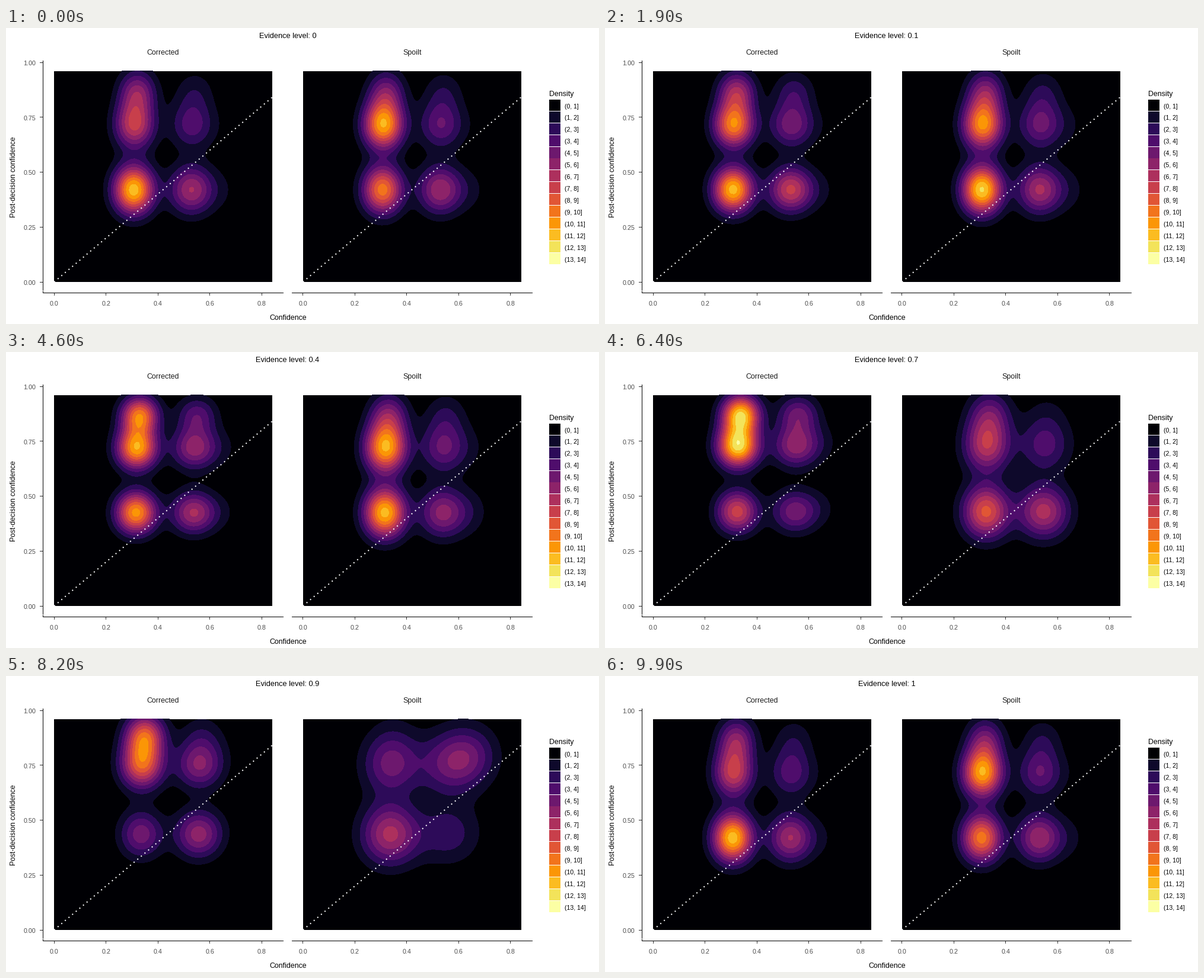
These frames come from a looping animation (1000x500 px, 10 s). A matplotlib script:

```python
import numpy as np
import matplotlib
import matplotlib.pyplot as plt
from matplotlib.animation import FuncAnimation
from matplotlib.patches import Rectangle

W, H, DPI = 1000, 500, 100
PX = 72 / DPI                      # points per pixel
plt.rcParams["font.family"] = "Liberation Sans"

# Panel geometry in stage pixels, y pointing down
LEFT, BOTTOM = 81.1, 429
UNIT_X, UNIT_Y = 437.5, 371.0      # pixels per data unit
MAX_X, MAX_Y = 0.842, 0.96
SHIFT = 419.6                      # second panel's offset

COLORS = matplotlib.colormaps["inferno"](np.linspace(0, 1, 14))
CONF = np.linspace(0, MAX_X, 120)
POST = np.linspace(0, MAX_Y, 120)
GX, GY = np.meshgrid(CONF, POST)

# Lobe heights at a few evidence levels; rows run low, middle, high
KEYS = (0, 0.25, 0.5, 0.7, 0.9)
CORRECTED = {
    "left": ((11.6, 11.4, 10.4, 7.5, 4.6),
             (7.1, 10.5, 10.7, 12.2, 8.4),
             (5.0, 6.0, 9.4, 11.4, 8.0)),
    "right": ((6.0, 7.5, 6.1, 4.6, 5.5),
              (3.5, 4.9, 5.5, 5.4, 5.0),
              (1.6, 2.7, 3.6, 4.2, 1.6)),
    "tail": ((0.8, 0.9, 0.8, 0.9, 0.2),
             (0.3, 0.5, 0.9, 1.0, 0.3)),
}
SPOILT = {
    "left": ((9.5, 12.8, 11.4, 8.3, 6.3),
             (10.8, 9.9, 10.8, 6.5, 4.2),
             (4.2, 4.8, 4.6, 3.9, 0.8)),
    "right": ((5.9, 6.2, 5.3, 6.4, 2.5),
              (3.9, 4.3, 4.0, 3.3, 3.4),
              (1.7, 1.9, 1.9, 1.0, 0.2)),
    "tail": ((1.0, 1.1, 1.3, 0.2, 0.2),
             (0.4, 0.9, 0.8, 0.2, 3.0)),
}
COLUMNS = {"left": (0.307, 1.0), "right": (0.528, 1.08), "tail": (0.645, 1.0)}


def corrected_width(e):
    return 0.053 + 0.006 * e**4, 0.076 - 0.025 * e + 0.032 * e**4


def spoilt_width(e):
    return 0.053 + 0.035 * e**4, 0.076 + 0.03 * e**4


def density(heights, width, e):
    """Sum of Gaussian lobes that drift and widen with evidence e."""
    sx, sy = width(e)
    rows = ((0.42 + 0.02 * e**2, 0, 1),
            (0.715 + 0.055 * e**4, 0.003, 1),
            (0.865 + 0.03 * e**4, 0.014, 0.92))
    total = np.zeros_like(GX)
    for column, (x0, wide) in COLUMNS.items():
        for (y, lean, narrow), keys in zip(rows, heights[column]):
            x = x0 + 0.035 * e**2 + lean
            if column == "tail":
                x, y = x0, y + 0.07 * e**4
            total += np.interp(e, KEYS, keys) * np.exp(
                -((GX - x) / (sx * wide * narrow)) ** 2 / 2
                - ((GY - y) / (sy * narrow)) ** 2 / 2)
    return total


fig = plt.figure(figsize=(W / DPI, H / DPI), dpi=DPI, facecolor="white")
ax = fig.add_axes([0, 0, 1, 1])
ax.axis("off")


def label(x, y, text, size=12.4, color="black", ha="center"):
    return ax.text(x, y, text, fontsize=size * PX, color=color, ha=ha,
                   va="baseline")


def box(x, y, w, h, color):
    ax.add_patch(Rectangle((x, y), w, h, fc=color, lw=0, antialiased=False))


def draw_panel(shift, name):
    left = LEFT + shift
    box(left, BOTTOM - MAX_Y * UNIT_Y, MAX_X * UNIT_X, MAX_Y * UNIT_Y,
        COLORS[0])
    label(265 + shift, 45, name, color="#1A1A1A")
    box(left - 19, 447, 406, 1, "black")
    for value in (0, 0.2, 0.4, 0.6, 0.8):
        x = left + value * UNIT_X
        box(int(x), 448, 1, 4, "#333333")
        label(x, 469, f"{value:.1f}", 10.8, "#4D4D4D")
    ends = np.array([-0.042, 0.884])
    ax.plot(left + ends * UNIT_X, BOTTOM - ends * UNIT_Y, color="white",
            lw=2 * PX, ls=(0, (1, 3)), dash_capstyle="butt", zorder=5)


def contours(z, shift):
    return ax.contourf(LEFT + shift + CONF * UNIT_X, BOTTOM - POST * UNIT_Y, z,
                       levels=range(1, 15), colors=COLORS[1:],
                       antialiased=False, zorder=2)


draw_panel(0, "Corrected")
draw_panel(SHIFT, "Spoilt")

box(62, 55, 1, 393, "black")
for value in (0, 0.25, 0.5, 0.75, 1):
    y = BOTTOM - value * UNIT_Y
    box(57, int(y), 5, 1, "#333333")
    label(50.5, y + 4.8, f"{value:.2f}", 10.8, "#4D4D4D", "right")

title = label(475, 17, "", 12.7)
label(475.5, 493, "Confidence")
ax.text(16, 252, "Post-decision confidence", fontsize=12.25 * PX,
        rotation=90, rotation_mode="anchor", ha="center", va="baseline")

label(916, 115, "Density", ha="left")
for i, color in enumerate(COLORS):
    y = 120.8 + 19.93 * i
    box(916, round(y), 19, 19, color)
    label(942, y + 14.7, f"({i}, {i + 1}]", 10.5, ha="left")

LEVELS = np.arange(11) / 10
layers = [(contours(density(CORRECTED, corrected_width, e), 0),
           contours(density(SPOILT, spoilt_width, e), SHIFT))
          for e in LEVELS]
ax.set_xlim(0, W)
ax.set_ylim(H, 0)

# First frame of each step; the surface switches one frame before the title
STARTS = np.array([10, 20, 29, 38, 47, 55, 64, 73, 82, 91, 100])


def update(frame):
    step = np.sum(frame >= STARTS)
    shown = np.sum(frame + 1 >= STARTS) % len(layers)
    title.set_text(f"Evidence level: {LEVELS[step]:g}")
    for s, pair in enumerate(layers):
        for layer in pair:
            layer.set_visible(s == shown)
    return [title]


anim = FuncAnimation(fig, update, frames=100, interval=100, repeat=True,
                     repeat_delay=0, blit=False)
plt.show()
```
